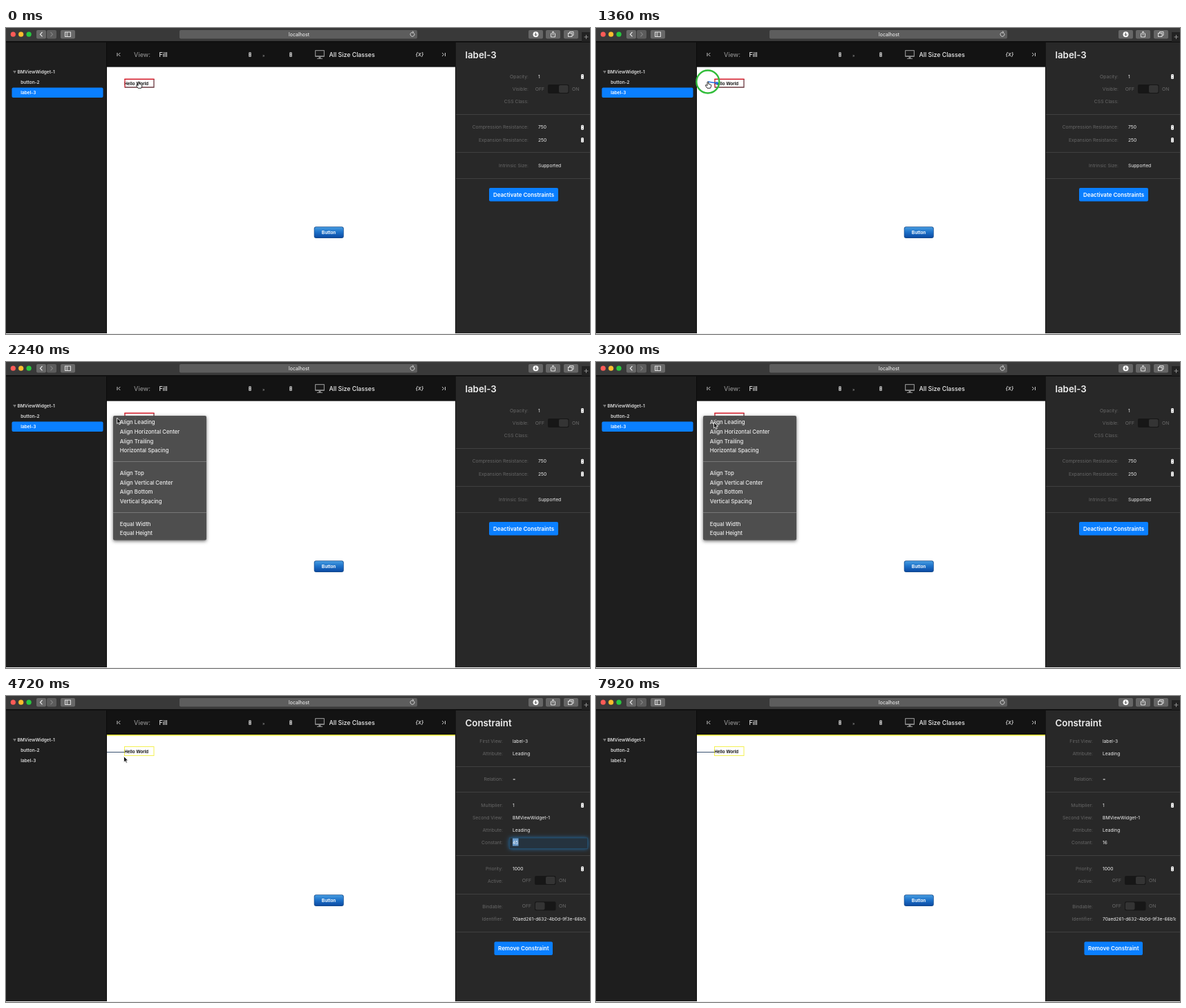
Recreate the animation shown at these times as an HTML page with a canvas. Size 845 px wide and 444 px high, loop 8000 ms.

```html
<!DOCTYPE html>
<html lang="en">
<head>
<meta charset="utf-8">
<title>Constraint editor</title>
<style>
html, body { margin: 0; width: 100%; height: 100%; overflow: hidden; background: #fff; }
canvas { display: block; width: 845px; height: 444px; }
</style>
</head>
<body>
<canvas id="stage" width="845" height="444"></canvas>
<script>
const c = document.getElementById('stage').getContext('2d');
const LOOP = 8000;
const UI = 'Inter, sans-serif';
const ARIAL = '"Liberation Sans", Arial, sans-serif';
const PRESS = 960, RELEASE = 1480, OPEN = 1520, PICK = 3360, SWAP = 3440;
const TYPE_1 = 5440, TYPE_2 = 5680, BLUR = 7360;

const clamp = v => Math.max(0, Math.min(1, v));
const span = (t, a, b) => clamp((t - a) / (b - a));
const smooth = p => p * p * (3 - 2 * p);

function text(s, x, y, size, color, weight = 400, align = 'left', font = UI) {
  c.font = `${weight} ${size}px ${font}`;
  c.textAlign = align;
  c.fillStyle = color;
  c.fillText(s, x, y + size * 0.36);
}

function rect(x, y, w, h, color) {
  c.fillStyle = color;
  c.fillRect(x, y, w, h);
}

function box(x, y, w, h, r, color) {
  c.beginPath();
  c.roundRect(x, y, w, h, r);
  c.fillStyle = color;
  c.fill();
}

function outline(x, y, w, h, color, lw = 1) {
  c.strokeStyle = color;
  c.lineWidth = lw;
  c.strokeRect(x, y, w, h);
}

function line(color, lw, ...p) {
  c.beginPath();
  for (let i = 0; i < p.length; i += 2) c.lineTo(p[i], p[i + 1]);
  c.strokeStyle = color;
  c.lineWidth = lw;
  c.stroke();
}

function dot(x, y, r, color) {
  c.beginPath();
  c.arc(x, y, r, 0, Math.PI * 2);
  c.fillStyle = color;
  c.fill();
}

function stepper(x, y, color) {
  box(x - 2, y - 3.5, 4, 7, 1.5, color);
  line('#333', 0.8, x - 1, y - 1, x, y - 2, x + 1, y - 1);
  line('#333', 0.8, x - 1, y + 1, x, y + 2, x + 1, y + 1);
}

function browserBar() {
  rect(0, 0, 845, 20, '#393939');
  rect(0, 19, 845, 2, '#101010');
  ['#fc5b57', '#fdbc2e', '#29c940'].forEach((k, i) => dot(10.3 + i * 11.4, 9.2, 3.6, k));
  box(44, 3, 14, 12.5, 2, '#686868');
  box(59, 3, 14, 12.5, 2, '#5c5c5c');
  box(79, 3, 21, 12.5, 2, '#686868');
  line('#eee', 1.1, 52.5, 6, 49.5, 9.2, 52.5, 12.4);
  line('#858585', 1.1, 64.5, 6, 67.5, 9.2, 64.5, 12.4);
  outline(85.5, 6, 8, 6.5, '#eee', 0.9);
  line('#eee', 0.9, 88.3, 6, 88.3, 12.5);

  box(251, 3, 344, 12.5, 2, '#5d5d5d');
  text('localhost', 424, 9.3, 7, '#fff', 400, 'center');
  c.beginPath();
  c.arc(588, 9.3, 3, -0.6, 4.9);
  c.strokeStyle = '#ddd';
  c.lineWidth = 0.9;
  c.stroke();
  line('#ddd', 0.9, 588, 4.7, 590, 6.3, 588, 7.8);

  [756, 781, 807].forEach(x => box(x, 3, 21, 12.5, 2, '#666'));
  dot(766.5, 9.2, 4, '#fff');
  line('#555', 1, 766.5, 6.8, 766.5, 11);
  line('#555', 1, 764.7, 9.2, 766.5, 11.2, 768.3, 9.2);
  line('#eee', 0.9, 790, 8, 788.5, 8, 788.5, 13, 794.5, 13, 794.5, 8, 793, 8);
  line('#eee', 0.9, 791.5, 10.5, 791.5, 5, 789.8, 6.7);
  line('#eee', 0.9, 791.5, 5, 793.2, 6.7);
  outline(813.5, 7.5, 5.5, 5, '#eee', 0.9);
  line('#eee', 0.9, 815.5, 7, 815.5, 5.5, 821, 5.5, 821, 10.5, 819.5, 10.5);
  rect(833, 6, 12, 14, '#222');
  line('#999', 0.9, 836.5, 13, 842.5, 13);
  line('#999', 0.9, 839.5, 10, 839.5, 16);
}

function toolbar() {
  rect(146, 21, 504, 35.5, '#131313');
  line('#ccc', 1, 161, 36, 161, 41);
  line('#ccc', 1, 165.3, 36, 162.8, 38.5, 165.3, 41);
  text('View:', 185, 38.6, 9, '#8b8b8b', 500);
  text('Fill', 221.5, 38.6, 9, '#eee', 500);
  stepper(353, 38.5, '#aaa');
  stepper(412, 38.5, '#aaa');
  text('»', 371, 39.5, 6, '#999');
  box(447, 32, 14, 10, 1, '#8b8b8b');
  rect(448.2, 33.2, 11.6, 7, '#181818');
  rect(452.5, 42, 3, 2, '#8b8b8b');
  rect(450, 44, 8, 1, '#8b8b8b');
  text('All Size Classes', 467.5, 38.6, 8.8, '#eee', 500);
  text('{x}', 598.5, 38.3, 8, '#ccc', 'italic 600', 'center');
  line('#ccc', 1, 635.5, 36, 635.5, 41);
  line('#ccc', 1, 631, 36, 633.5, 38.5, 631, 41);
}

function sidebar(picked) {
  rect(0, 21, 146, 423, '#1e1e1e');
  rect(145, 21, 1, 423, '#0c0c0c');
  c.beginPath();
  c.moveTo(10, 62);
  c.lineTo(15, 62);
  c.lineTo(12.5, 66);
  c.fillStyle = '#777';
  c.fill();
  if (picked) box(8.5, 86.5, 132, 14.5, 2, '#0a7fff');
  text('BMViewWidget-1', 16.5, 64, 6.5, '#ddd', 600);
  text('button-2', 21.3, 79, 6.5, '#ddd', 600);
  text('label-3', 21.3, 94, 6.5, picked ? '#fff' : '#ddd', 600);
}

function toggle(x, y, on) {
  text('OFF', x - 5, y, 6.8, '#6a6a6a', 400, 'right');
  text('ON', x + 35, y, 6.8, '#6a6a6a');
  box(x, y - 6.5, 30.5, 13, 2, '#171717');
  box(x + (on ? 16 : 1), y - 5.5, 13.5, 11, 2, '#343434');
}

function rows(edge, list) {
  list.forEach(([name, value, y]) => {
    text(name + ':', edge, y, 6.8, '#676767', 400, 'right');
    if (value) text(value, edge + 14, y, 6.7, '#f2f2f2');
  });
}

const rules = ys => ys.forEach(y => rect(651, y, 194, 1, '#404040'));

function action(x, y, w, label) {
  box(x, y, w, 19.5, 2, '#0a7fff');
  text(label, x + w / 2, y + 9.7, 8, '#fff', 600, 'center');
}

function viewPanel() {
  text('label-3', 664.5, 39, 13.3, '#eee', 600);
  rows(756, [
    ['Opacity', '1', 70.3], ['Visible', '', 88.3], ['CSS Class', '', 106.5],
    ['Compression Resistance', '750', 144], ['Expansion Resistance', '250', 162.2],
    ['Intrinsic Size', 'Supported', 199.2]
  ]);
  toggle(784, 88.5, true);
  [70.5, 144.3, 162.5].forEach(y => stepper(834, y, '#fff'));
  rules([125, 180, 218]);
  action(699, 232, 100, 'Deactivate Constraints');
}

function constantField(t) {
  const focused = t < BLUR;
  const value = t < TYPE_1 ? '45' : t < TYPE_2 ? '1' : '16';
  if (focused) {
    c.save();
    c.shadowColor = '#2576b8';
    c.shadowBlur = 6;
    box(728.5, 206, 113, 15.5, 1.5, '#25333f');
    c.restore();
    outline(728.5, 206, 113, 15.5, '#24506f', 0.8);
    if (t < TYPE_1) rect(733, 206.5, 8.5, 11, '#6a9bcb');
  }
  text(value, 733, 213, 6.7, '#f2f2f2');
  const blinkOn = t < TYPE_2 || (t - TYPE_2) % 1060 < 560;
  if (focused && t >= TYPE_1 && blinkOn) {
    rect(733.4 + c.measureText(value).width, 208, 0.8, 9.5, '#e8e8e8');
  }
}

function constraintPanel(t) {
  text('Constraint', 664.5, 39, 13.3, '#eee', 600);
  rows(719, [
    ['First View', 'label-3', 65.5], ['Attribute', 'Leading', 84],
    ['Relation', '=', 121],
    ['Multiplier', '1', 158.2], ['Second View', 'BMViewWidget-1', 176.5],
    ['Attribute', 'Leading', 195], ['Constant', '', 213],
    ['Priority', '1000', 250.3], ['Active', '', 268.5],
    ['Bindable', '', 305.5], ['Identifier', '', 324]
  ]);
  c.save();
  c.beginPath();
  c.rect(733, 316, 106, 16);
  c.clip();
  text('70aed261-d632-4b0d-9f3e-66b1c', 733, 324, 6.6, '#f2f2f2');
  c.restore();
  constantField(t);
  toggle(765, 267.5, true);
  toggle(765, 304.7, false);
  stepper(834, 158.5, '#fff');
  stepper(834, 250.7, '#fff');
  rules([102, 139, 231, 287, 342]);
  action(706.5, 356.5, 84.5, 'Remove Constraint');
}

function canvasArea(t, pos) {
  rect(146, 56.5, 504, 387.5, '#fff');
  const done = t >= SWAP;
  const dragging = t >= PRESS && t < RELEASE;
  const hot = dragging && pos.x > 171;
  if (hot) rect(172, 74, 42, 12, '#b4d5fa');
  text('Hello World', 171.3, 80.3, 6.3, '#111', 700, 'left', ARIAL);
  if (done) {
    rect(146, 56, 504, 1.3, '#e9e52a');
    outline(171.5, 73.5, 42.5, 13, '#f3f052');
    rect(146, 81, 25.5, 1, '#38506e');
  } else {
    line(hot ? '#27508f' : '#6b3a40', 1.3, 172, 86, 214, 86, 214, 74);
    line(hot ? '#27508f' : '#c8202c', 1.3, 172, 86.5, 172, 74);
    line('#d41a28', 1.5, 171.3, 74.2, 214.6, 74.2);
  }
  if (dragging) {
    line('#1f6fe0', 1.5, 175, 80, pos.x, pos.y);
    dot(175, 80, 2, '#1f6fe0');
  }

  const g = c.createLinearGradient(0, 288, 0, 305);
  g.addColorStop(0, '#4a9fe2');
  g.addColorStop(0.5, '#1c70c8');
  g.addColorStop(1, '#0a469f');
  box(445.7, 288.3, 43, 16.6, 3, '#174d8e');
  box(446.5, 289.1, 41.4, 15, 2.4, g);
  text('Button', 467, 296.8, 6.3, '#fff', 700, 'center', ARIAL);
}

const MENU = [
  ['Align Leading', 'Align Horizontal Center', 'Align Trailing', 'Horizontal Spacing'],
  ['Align Top', 'Align Vertical Center', 'Align Bottom', 'Vertical Spacing'],
  ['Equal Width', 'Equal Height']
];

function menu(t) {
  if (t < OPEN || t > 3560) return;
  const inv = 1 - span(t, OPEN, OPEN + 320);
  const shown = 1 - inv * inv;
  const left = 1 - span(t, PICK, 3560);
  const size = 0.7 + 0.3 * Math.min(shown, left);
  const fade = Math.pow(left, 1.6);

  c.save();
  c.translate(155, 78);
  c.scale(size, size);
  c.globalAlpha = shown * fade * 0.96;
  c.save();
  c.shadowColor = 'rgba(0,0,0,.6)';
  c.shadowBlur = 5;
  c.shadowOffsetY = 1.5;
  box(0, 0, 135, 180.5, 2, '#4e4e4e');
  c.restore();

  let k = 0;
  MENU.forEach((group, n) => {
    group.forEach((label, i) => {
      const q = span(t, OPEN + k * 30, OPEN + 170 + k * 30);
      c.globalAlpha = q * (0.5 + shown * 0.4) * fade;
      text(label, 9.8, 9.4 + n * 73.7 + i * 13.7 + (1 - q) * 7, 7.8, '#fff', 500);
      k++;
    });
    if (n < 2) {
      c.globalAlpha = span(t, OPEN + k * 30, OPEN + 170 + k * 30) * fade;
      rect(0, 66 + n * 74, 135, 1, '#777');
    }
  });
  c.restore();
}

// Times and hotspot positions of the pointer
const PATH = [[0, 192, 78], [300, 192, 78], [880, 179, 78], [1160, 179, 78],
  [1460, 156, 78], [2000, 156, 78], [2640, 170.5, 87.5], [LOOP, 170.5, 87.5]];

function pointerAt(t) {
  const i = PATH.findIndex((p, n) => n && t < p[0]);
  const [t0, x0, y0] = PATH[i - 1], [t1, x1, y1] = PATH[i];
  const p = smooth(span(t, t0, t1));
  return { x: x0 + (x1 - x0) * p, y: y0 + (y1 - y0) * p };
}

const HAND = new Path2D('M-.9 .5Q0-.6 .9 .5V3.2L2.2 3.3L3.5 3.8L4.7 4.5V6.8L3.6 9.3H-.9L-3 6.5L-3.4 4.8Q-2.2 4-.9 5.7Z');
const ARROW = new Path2D('M0 0V8.6L2 6.8L3.3 9.8L4.8 9.1L3.5 6.2H6.1Z');

function pointer(t, pos) {
  if (t >= TYPE_1) return;
  const hand = t < 1760;
  if (t >= PRESS && t < RELEASE) {
    c.beginPath();
    c.arc(pos.x, pos.y, 16.5, 0, Math.PI * 2);
    c.strokeStyle = '#31bd3a';
    c.lineWidth = 2.4;
    c.stroke();
  }
  c.save();
  c.translate(pos.x, pos.y);
  c.fillStyle = hand ? '#fff' : '#111';
  c.strokeStyle = hand ? '#111' : '#eee';
  c.lineWidth = 0.9;
  c.fill(hand ? HAND : ARROW);
  c.stroke(hand ? HAND : ARROW);
  c.restore();
}

function draw(t) {
  const pos = pointerAt(t);
  canvasArea(t, pos);
  menu(t);
  toolbar();
  if (t >= SWAP) rect(146, 56, 504, 1.3, '#e9e52a');
  sidebar(t < SWAP);
  rect(650, 21, 195, 423, '#282828');
  rect(650, 21, 1, 423, '#151515');
  if (t < SWAP) viewPanel(); else constraintPanel(t);
  browserBar();
  rect(0, 443, 845, 1, '#eee');
  pointer(t, pos);
}

const start = performance.now();
function tick() {
  draw((performance.now() - start) % LOOP);
  requestAnimationFrame(tick);
}
tick();
</script>
</body>
</html>
```
